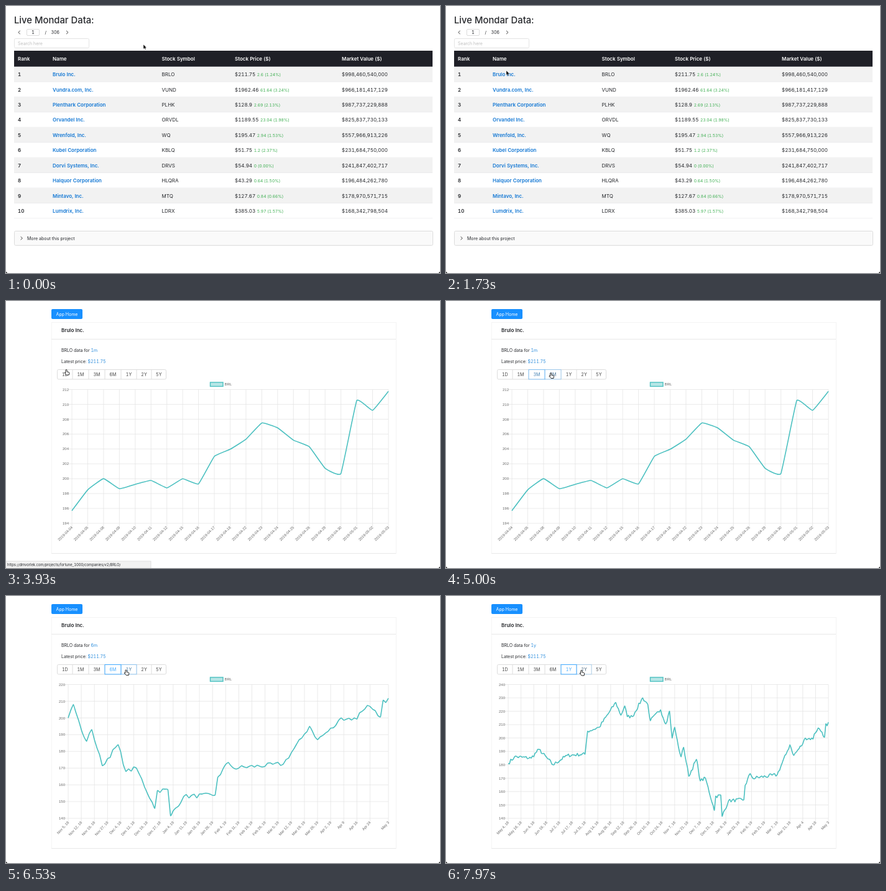
An HTML page that plays this animation: 698 by 430 pixels, repeating every 8 s.

```html
<!DOCTYPE html>
<html lang="en">
<head>
<meta charset="utf-8">
<title>Live stock data</title>
<style>
  html, body { margin: 0; width: 100%; height: 100%; overflow: hidden; background: #fff; }
  svg { display: block; }
  text { font: 7px Inter, sans-serif; fill: #26282c; white-space: pre; font-variant-numeric: tabular-nums; }
  .title { font-size: 14.8px; font-weight: 500; }
  .cell { font-size: 8px; }
  .bold { font-size: 8px; font-weight: 600; }
  .axis { font: 6px "Liberation Sans", Arial, sans-serif; fill: #666; }
</style>
</head>
<body>
<svg id="stage" width="698" height="430" viewBox="0 0 698 430"></svg>
<script>
const LOOP = 8000, OPEN = 2530, LEAVE = 4420, FADE = 300, EASE_TIME = 1000;
const GRID = '#e5e5e5', BORDER = '#dcdcdc', LINE = '#4bc0c0', BLUE = '#40a9ff';

function add(parent, tag, attrs = {}, content) {
  const node = document.createElementNS('http://www.w3.org/2000/svg', tag);
  for (const key in attrs) node.setAttribute(key, attrs[key]);
  if (content !== undefined) node.textContent = content;
  parent.append(node);
  return node;
}
// Text is placed by its vertical middle.
const label = (parent, x, y, content, attrs = {}) =>
  add(parent, 'text', { x, y, dy: '.36em', ...attrs }, content);
const box = (parent, x, y, width, height, attrs) =>
  add(parent, 'rect', { x, y, width, height, ...attrs });
const stroke = (parent, d, color, width = 1) =>
  add(parent, 'path', { d, fill: 'none', stroke: color, 'stroke-width': width });
const show = (node, on) => { node.style.display = on ? '' : 'none'; };
const clamp = v => Math.max(0, Math.min(1, v));
const mix = (a, b, u) => a + (b - a) * u;

const stage = document.getElementById('stage');
const tablePage = add(stage, 'g'), stockPage = add(stage, 'g');

// ---- Table page ----
const companies = [
  ['Brulo Inc.', 'BRLO', '$211.75', '2.6 (1.24%)', '$998,460,540,000'],
  ['Vundra.com, Inc.', 'VUND', '$1962.46', '61.64 (3.24%)', '$966,181,417,129'],
  ['Plenthark Corporation', 'PLHK', '$128.9', '2.69 (2.13%)', '$987,737,229,888'],
  ['Orvandel Inc.', 'ORVDL', '$1189.55', '23.04 (1.98%)', '$825,837,730,133'],
  ['Wrenfold, Inc.', 'WQ', '$195.47', '2.94 (1.53%)', '$557,966,913,226'],
  ['Kubel Corporation', 'KBLQ', '$51.75', '1.2 (2.37%)', '$231,684,750,000'],
  ['Dorvi Systems, Inc.', 'DRVS', '$54.94', '0 (0.00%)', '$241,847,402,717'],
  ['Halquor Corporation', 'HLQRA', '$43.29', '0.64 (1.50%)', '$196,484,262,780'],
  ['Mintavo, Inc.', 'MTQ', '$127.67', '0.84 (0.66%)', '$178,970,571,715'],
  ['Lumdrix, Inc.', 'LDRX', '$385.03', '5.97 (1.57%)', '$168,342,798,504'],
];
const columns = [19, 75, 250.5, 368, 540];

function buildTable() {
  const g = tablePage;
  label(g, 13, 22.5, 'Live Mondar Data:', { class: 'title' });
  stroke(g, 'M22.8 39.8L19.8 42.5 22.8 45.2M97 39.8L100 42.5 97 45.2', '#333', .9);
  box(g, 33.5, 37.5, 20, 10, { rx: 1.5, fill: '#fff', stroke: BORDER });
  label(g, 43.5, 42.7, '1', { 'text-anchor': 'middle' });
  label(g, 62.5, 42.7, '/');
  label(g, 72.5, 42.7, '306');
  box(g, 13.5, 52.5, 120, 15, { rx: 2, fill: '#fff', stroke: '#e4e4e4' });
  label(g, 19, 60, 'Search here', { style: 'fill:#bfbfbf' });

  box(g, 13, 72, 673, 25.8, { fill: '#1f2027' });
  ['Rank', 'Name', 'Stock Symbol', 'Stock Price ($)', 'Market Value ($)'].forEach((head, i) =>
    label(g, columns[i], 85.3, head, { class: 'bold', style: 'fill:#fff' }));

  companies.forEach(([name, symbol, price, change, value], i) => {
    const top = 97.8 + 24.42 * i, y = top + 12.5;
    if (i % 2 === 0) box(g, 13, top, 673, 24.42, { fill: '#f2f2f2' });
    stroke(g, `M13 ${top + 24.2}H686`, '#e6e6ea', .6);
    label(g, columns[0], y, i + 1, { class: 'bold' });
    label(g, columns[1], y, name, { class: 'bold', style: 'fill:#1478d4' });
    label(g, columns[2], y, symbol, { class: 'cell' });
    const cost = label(g, columns[3], y, price, { class: 'cell' });
    add(cost, 'tspan', { dx: 2.6, style: 'font-size:6.6px;fill:#3cae50' }, change);
    label(g, columns[4], y, value, { class: 'cell' });
  });

  box(g, 13.5, 362.5, 673, 23, { rx: 2, fill: '#fafafa', stroke: BORDER });
  stroke(g, 'M23.6 371.4L26.4 374 23.6 376.6', '#333', .9);
  label(g, 34, 374, 'More about this project');
}

// ---- Price history: turning points [trading day, price] with small noise between ----
const turns = [
  [0, 181], [5, 186], [18, 185], [24, 191.5], [35, 180], [46, 187], [60, 188], [62, 205],
  [71, 208], [84, 226.5], [88, 217], [91, 224], [93, 216], [97, 216], [105, 230], [109, 225],
  [111, 213], [119, 221], [123, 210.5], [126, 220], [128, 200], [130, 208], [133, 193],
  [135, 186], [137, 193], [141, 171.5], [147, 184], [150, 168], [154, 170], [161, 146],
  [162, 156.5], [166, 157], [167, 141.6], [172, 153], [184, 154], [185, 164.5], [189, 173.4],
  [191, 170], [210, 172.5], [217, 188], [220, 195], [223, 187], [230, 195.7], [232, 200],
  [238, 199.3], [239, 203], [242, 207.5], [245, 204.3], [247, 200.7], [248, 210.5],
  [249, 209.2], [250, 211.75]];

function seeded(seed) {
  return () => (seed = (seed * 16807) % 2147483647) / 2147483647;
}

function priceHistory() {
  const random = seeded(7), prices = [];
  turns.slice(1).forEach(([day, price], i) => {
    const [from, first] = turns[i];
    for (let d = from; d < day; d++) {
      const noise = d === from ? 0 : (random() - .5) * 2.6;
      prices.push(mix(first, price, (d - from) / (day - from)) + noise);
    }
  });
  return [...prices, turns.at(-1)[1]];
}

function tradingDays() {
  const closed = '05-28 07-04 09-03 11-22 12-05 12-25 01-01 01-21 02-18 04-19'.split(' ');
  const days = [];
  for (let ms = Date.UTC(2018, 4, 4); ms <= Date.UTC(2019, 4, 3); ms += 864e5) {
    const date = new Date(ms);
    if (date.getUTCDay() % 6 && !closed.includes(isoDate(date).slice(5))) days.push(date);
  }
  return days;
}
const isoDate = date => date.toISOString().slice(0, 10);
function shortDate(date) {
  const text = date.toLocaleDateString('en-US', { month: 'short', day: 'numeric', timeZone: 'UTC' });
  return date >= Date.UTC(2019, 3, 4) ? text : `${text}, ${date.getUTCFullYear() % 100}`;
}
const year = priceHistory(), days = tradingDays();

// ---- Charts ----
const TOP = 142.5;
const charts = [
  { start: OPEN, name: '', prices: [], low: -1, high: 1, step: .2, left: 100, right: 604, bottom: 380.5 },
  { start: 3630, name: '1m', prices: year.slice(-21), low: 194, high: 212, step: 2, left: 106, skip: 1, format: isoDate, turn: -45 },
  { start: 5300, name: '6m', prices: year.slice(-123), low: 140, high: 220, step: 10, left: 100, skip: 5, format: shortDate, turn: -48 },
  { start: 6730, name: '1y', prices: year, low: 140, high: 240, step: 10, left: 100, skip: 10, format: shortDate, turn: -48 },
];
const chartAt = t => charts.findLastIndex(chart => t >= chart.start);

function buildChart(chart) {
  const { name, prices, low, high, step, left, right = 615, bottom = 358, skip, format, turn } = chart;
  const g = chart.group = add(stockPage, 'g'), count = prices.length;
  const xAt = i => mix(left, right, i / (count - 1));
  const yAt = v => mix(bottom, TOP, (v - low) / (high - low));
  chart.points = prices.map((price, i) => [xAt(i), yAt(price)]);

  const rows = Math.round((high - low) / step);
  for (let i = 0; i <= rows; i++) {
    const value = low + i * step, y = yAt(value), zero = Math.abs(value) < .01;
    stroke(g, `M${left - 5} ${y}H${right}`, zero ? '#b8b8b8' : GRID, .8);
    const text = count ? value : zero ? '0' : value.toFixed(1);
    label(g, left - 5, y, text, { class: 'axis', 'text-anchor': 'end' });
  }
  if (!count) stroke(g, `M${left} ${TOP}V${bottom}`, GRID, .8);
  for (let i = 0; i < count; i++) {
    const last = i === count - 1;
    if (!last && (i % skip || (skip > 1 && i + skip >= count))) continue;
    const x = xAt(i);
    stroke(g, `M${x} ${TOP}V${bottom + 5}`, GRID, .8);
    label(g, 0, 0, format(days[days.length - count + i]), {
      class: 'axis', 'text-anchor': 'end', transform: `translate(${x} ${bottom + 5.5}) rotate(${turn})` });
  }
  const accent = { style: 'fill:#2f8fdd' };
  add(label(g, 89, 79, 'BRLO data for '), 'tspan', accent, name);
  add(label(g, 89, 97.5, 'Latest price: '), 'tspan', accent, count ? '$211.75' : '$');
}

// Points shared with the previous range slide over; new ones appear in place.
function linePath(index, t) {
  const { points, start } = charts[index], from = index ? charts[index - 1].points : [];
  const eased = 1 - (1 - clamp((t - start) / EASE_TIME)) ** 4;
  const p = points.map((to, i) => from[i] ? to.map((v, axis) => mix(from[i][axis], v, eased)) : to);
  const last = p.length - 1, bend = .05;
  const slope = (i, axis) => bend * (p[Math.min(i + 1, last)][axis] - p[Math.max(i - 1, 0)][axis]);
  return p.map(([x, y], i) => {
    if (!i) return `M${x} ${y}`;
    const [px, py] = p[i - 1];
    return 'C' + [px + slope(i - 1, 0), py + slope(i - 1, 1), x - slope(i, 0), y - slope(i, 1), x, y]
      .map(v => v.toFixed(2)).join(' ');
  }).join('');
}

// ---- Stock page ----
const ranges = ['1D', '1M', '3M', '6M', '1Y', '2Y', '5Y'];
const edges = [82.5, 107, 133, 159, 185, 210, 234, 257.5];

function rangeText(g, i, color) {
  label(g, (edges[i] + edges[i + 1]) / 2, 118.5, ranges[i], { 'text-anchor': 'middle', style: `fill:${color}` });
}

function buildStockPage() {
  const g = stockPage;
  box(g, 73, 13, 50, 16, { rx: 2, fill: '#1890ff' });
  label(g, 98, 21, 'App Home', { 'text-anchor': 'middle', style: 'fill:#fff' });
  box(g, 73.5, 34.5, 554, 372, { fill: 'none', stroke: '#f4f4f4' });
  stroke(g, 'M73 61.5H627M73 406.5H627', '#e8e8e8');
  label(g, 89, 47.5, 'Brulo Inc.', { class: 'bold' });
  box(g, 82.5, 110.5, 175, 15.5, { rx: 2, fill: '#fff', stroke: BORDER });
  ranges.forEach((_, i) => {
    if (i) stroke(g, `M${edges[i]} 110.5V126`, BORDER);
    rangeText(g, i, '#444');
  });
  box(g, 328.5, 131, 20.5, 6.5, { fill: '#b7e6e6', stroke: LINE, 'stroke-width': 1.4 });
  label(g, 351.5, 134.3, 'BRL', { class: 'axis' });
  charts.forEach(buildChart);
}

buildTable();
buildStockPage();
const line = stroke(stockPage, '', LINE, 1.6);
line.setAttribute('stroke-linejoin', 'round');
const glows = ranges.map((_, i) => {
  const g = add(stockPage, 'g');
  box(g, edges[i], 110.5, edges[i + 1] - edges[i], 15.5, { fill: '#fff', stroke: BLUE });
  rangeText(g, i, BLUE);
  return g;
});

// ---- Window corners, link preview and pointer ----
stroke(stage, 'M0 428.5L1.5 430M698 428.5L696.5 430', '#000', 1.2);
const preview = add(stage, 'g');
box(preview, -1, 419, 234, 12, { fill: '#f2f2f2', stroke: '#dadada', 'stroke-width': .8 });
label(preview, 2, 425, 'https://dmvorlek.com/projects/fortune_1000/companies/v2/BRLO/', { style: 'font-size:5.8px' });

const pointer = add(stage, 'g', { 'stroke-linejoin': 'round' });
const arrow = add(pointer, 'path', {
  d: 'M0 0V7.2L1.7 5.7 2.8 8.2 4 7.7 2.9 5.2H5.1Z', fill: '#000', stroke: '#fff', 'stroke-width': .4 });
const hand = add(pointer, 'path', {
  d: 'M0 0Q1.1 0 1.1 1.2V3.5L4 4.1Q5 4.4 4.8 5.6L4.3 8.6H.3L-2.6 5.4Q-3 4.4-2 4.5L-1.1 5.2V1.2Q-1.1 0 0 0Z',
  fill: '#fff', stroke: '#111', 'stroke-width': .9 });

// Each move: start, end, target x, target y.
const moves = [
  [0, 0, 221, 62], [350, 1650, 97, 104], [1760, 2050, 97, 110.5],
  [LEAVE, 5040, 169.5, 116], [6180, 6520, 193, 119], [7790, 7980, 218, 119.5]];

function pointerAt(t) {
  return moves.reduce(([x, y], [start, end, toX, toY]) => {
    const u = clamp((t - start) / (end - start || 1)), s = end ? u * u * (3 - 2 * u) : 1;
    return [mix(x, toX, s), mix(y, toY, s)];
  }, [0, 0]);
}

// A button is lit while hovered or while its range is the last one picked.
function isLit(i, t) {
  if (t < LEAVE) return false;
  const [x] = pointerAt(t), picked = charts[chartAt(t + 120)].name;
  return (x >= edges[i] && x < edges[i + 1]) || (picked !== '1m' && picked === ranges[i].toLowerCase());
}
function glowAt(i, t) {
  const samples = 10;
  let lit = 0;
  for (let k = 0; k < samples; k++) lit += isLit(i, t - k * FADE / samples);
  return lit / samples;
}

function render(t) {
  const opened = t >= OPEN, overLink = t >= 1790;
  show(tablePage, !opened);
  show(stockPage, opened);
  show(preview, t >= 1830 && t < LEAVE);
  show(arrow, !overLink);
  show(hand, overLink);
  pointer.setAttribute('transform', `translate(${pointerAt(t).map(v => v.toFixed(2))})`);

  if (!opened) return;
  const current = chartAt(t);
  charts.forEach((chart, i) => show(chart.group, i === current));
  line.setAttribute('d', linePath(current, t));
  glows.forEach((glow, i) => glow.setAttribute('opacity', glowAt(i, t)));
}

const began = performance.now();
function tick() {
  render((performance.now() - began) % LOOP);
  requestAnimationFrame(tick);
}
tick();
</script>
</body>
</html>
```
